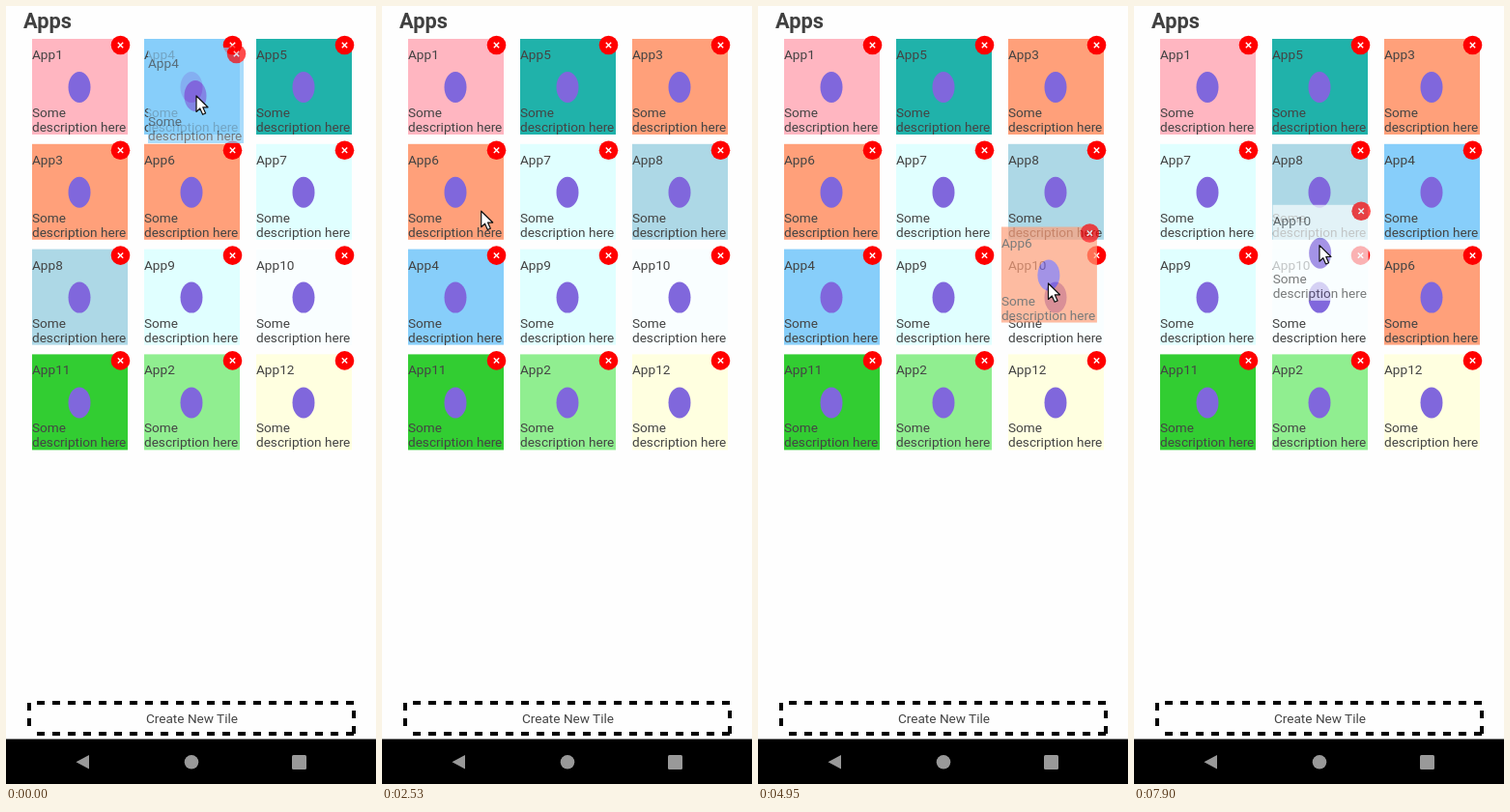
An HTML page that plays this animation: 383x805 px, repeating every 8000 ms.

```html
<!DOCTYPE html>
<html lang="en">
<head>
<meta charset="utf-8">
<title>Tile board</title>
<style>
  html, body { margin: 0; width: 100%; height: 100%; overflow: hidden; background: #fefefe; }
  body { position: relative; font: 13.6px/15.7px Roboto, sans-serif; color: #444; }
  h1 { position: absolute; left: 18px; top: 2.5px; margin: 0; font-size: 21.8px; line-height: 26px; color: #404040; }
  #board { position: absolute; inset: 0; isolation: isolate; }
  .tile { position: absolute; left: 0; top: 0; width: 98.6px; height: 98.6px; white-space: nowrap; }
  .tile b { position: absolute; left: 0; top: 9.4px; font-weight: 400; }
  .tile p { position: absolute; left: 0; top: 68.7px; margin: 0; }
  .tile svg, #frame, #cursor { position: absolute; left: 0; top: 0; overflow: visible; }
  #create { position: absolute; left: 22px; width: 341px; top: 729.5px; text-align: center; }
</style>
</head>
<body>
<h1>Apps</h1>
<svg id="frame" width="383" height="805">
  <g fill="none" stroke="#000" stroke-width="4" stroke-dasharray="8">
    <path d="M24 753V721H360V753" stroke-dashoffset="8"/>
    <path d="M360 753H24"/>
  </g>
  <rect y="758.5" width="383" height="46.5"/>
  <g fill="#999">
    <path d="M72.5 782.3L86 775V789.6Z"/>
    <circle cx="192" cy="782.3" r="7.3"/>
    <rect x="296" y="775" width="15" height="15" rx="1.5"/>
  </g>
</svg>
<div id="create">Create New Tile</div>
<div id="board"></div>
<svg id="cursor" width="14" height="21">
  <path d="M0 0V16.5L3.8 13L6.6 19.3L9.6 18L6.8 11.8H12Z" fill="#fff" stroke="#111" stroke-width="1.2" stroke-linejoin="round"/>
</svg>
<script>
const LOOP = 8000, STEP = 136, PHASE = 12;
const MOVE_MS = 250, LAG = 70, GRAB = 50;

const colors = {
  1: 'lightpink', 2: 'lightgreen', 3: 'lightsalmon', 4: 'lightskyblue',
  5: 'lightseagreen', 6: 'lightsalmon', 7: 'lightcyan', 8: 'lightblue',
  9: 'lightcyan', 10: '#f9feff', 11: 'limegreen', 12: 'lightyellow'
};
const firstOrder = [1, 4, 5, 3, 6, 7, 8, 9, 10, 11, 2, 12];
const moves = [{ at: 2172, from: 1, to: 6 }, { at: 5607, from: 3, to: 8 }];
const drags = [
  { app: 4, start: 0, end: 1980 },
  { app: 6, start: 3540, end: 6500 },
  { app: 10, start: 7480, end: LOOP }
];

// The pointer glides from stop to stop; a dragged tile trails behind it
const home = { x: 197, y: 93 };
const glides = [
  { start: 290, end: 1030, x: 196, y: 300 },
  { start: 1030, end: 1290, x: 84, y: 300 },
  { start: 1940, end: 2180, x: 103, y: 213 },
  { start: 2400, end: 2980, x: 92, y: 184 },
  { start: 3548, end: 4480, x: 318, y: 181 },
  { start: 4560, end: 4900, x: 300.5, y: 287 },
  { start: 6400, end: 6760, x: 202, y: 296 },
  { start: 7480, end: LOOP, x: 191, y: 243 }
];

const board = document.getElementById('board');
const cursor = document.getElementById('cursor');

function makeTile() {
  const el = document.createElement('div');
  el.className = 'tile';
  el.innerHTML = `<b></b><p>Some<br>description here</p>
    <svg width="99" height="99">
      <ellipse cx="49" cy="50" rx="11.5" ry="16" fill="#8067dc"/>
      <circle cx="91.5" cy="6.5" r="9.8" fill="#f00"/>
      <path d="M88.8 3.8l5.4 5.4m0-5.4l-5.4 5.4" stroke="#fff" stroke-width="1.4"/>
    </svg>`;
  board.append(el);
  return el;
}

function dress(el, app) {
  el.style.background = colors[app];
  el.firstChild.textContent = 'App' + app;
}

function place(el, { x, y }) {
  el.style.transform = `translate(${x}px, ${y}px)`;
}

const clamp = k => Math.max(0, Math.min(1, k));
const ease = k => (1 - Math.cos(Math.PI * clamp(k))) / 2;
const mix = (a, b, k) => ({ x: a.x + (b.x - a.x) * k, y: a.y + (b.y - a.y) * k });
const slot = i => ({ x: 27 + 116 * (i % 3), y: 34 + 108.8 * Math.floor(i / 3) });
const snap = t => Math.max(0, PHASE + STEP * Math.floor((t - PHASE) / STEP));

const pointer = t => glides.reduce(
  (pos, g) => mix(pos, g, ease((t - g.start) / (g.end - g.start))), home);

function reorder(list, { from, to }) {
  const next = list.slice();
  next.splice(to, 0, next.splice(from, 1)[0]);
  return next;
}

const tiles = {};
for (const app of firstOrder) dress(tiles[app] = makeTile(), app);
const ghost = makeTile();
ghost.style.zIndex = 50;
ghost.style.opacity = 0.7;

function draw(t) {
  let before = firstOrder, after = firstOrder, from = 0, k = 1;
  for (const m of moves) {
    if (t < m.at) break;
    before = after;
    after = reorder(before, m);
    from = m.from;
    k = ease((t - m.at) / MOVE_MS);
  }
  after.forEach((app, i) => {
    const { style } = tiles[app];
    place(tiles[app], mix(slot(before.indexOf(app)), slot(i), k));
    style.zIndex = 20 - i;
    // Outgoing and incoming copies cross-fade
    style.opacity = i < from ? 1 : 1 - k * (1 - k);
  });

  const drag = drags.find(d => t >= d.start && t < d.end);
  ghost.style.display = drag ? 'block' : 'none';
  if (drag) {
    const { x, y } = pointer(t - LAG);
    dress(ghost, drag.app);
    place(ghost, { x: x - GRAB, y: y - GRAB });
  }
  place(cursor, pointer(t));
}

const begin = performance.now();
function tick() {
  draw(snap((performance.now() - begin) % LOOP));
  requestAnimationFrame(tick);
}
tick();
</script>
</body>
</html>
```
